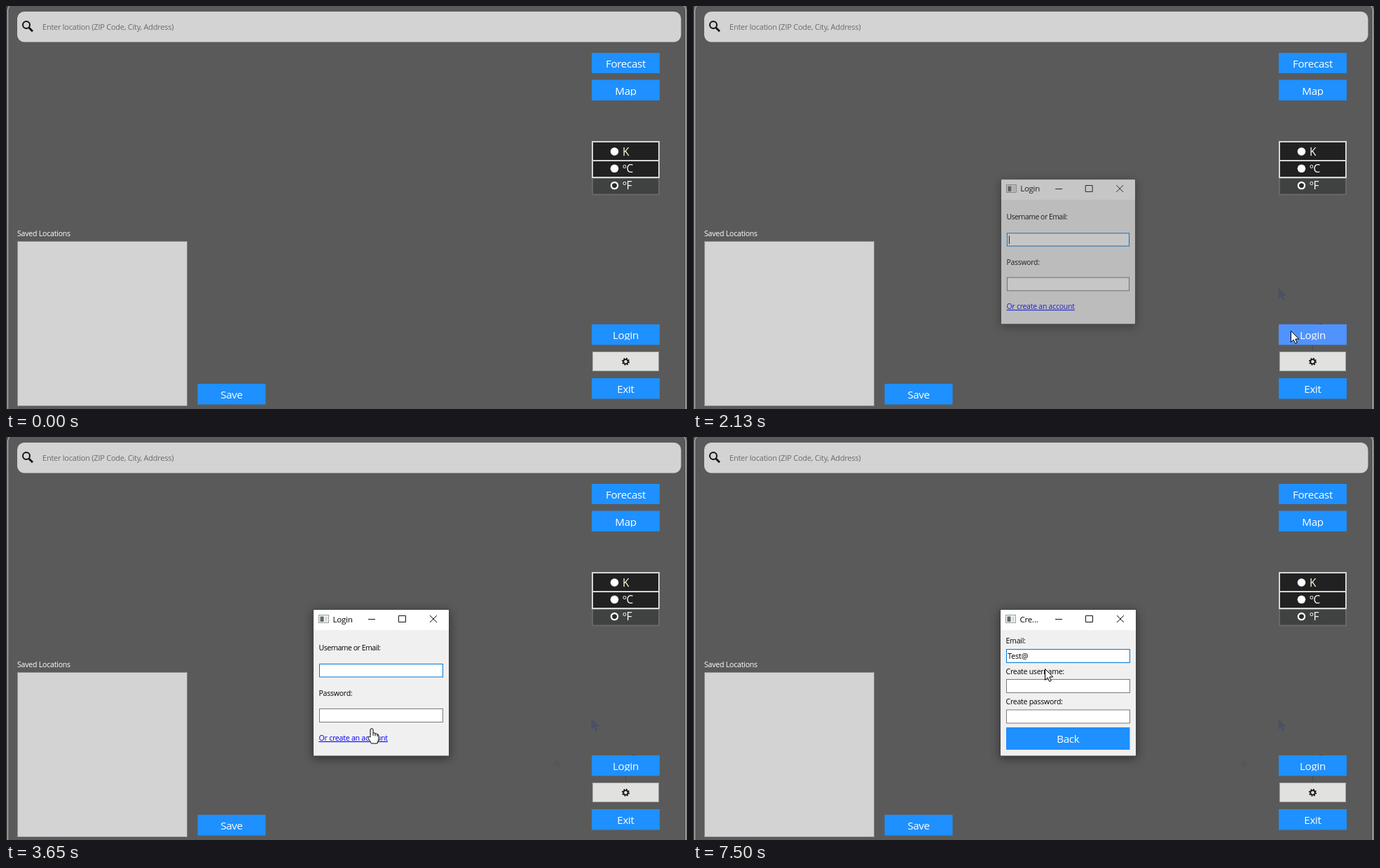
Write an HTML page that moves like this. It is 972 by 576 pixels and loops after 8 s.

```html
<!DOCTYPE html>
<html lang="en">
<head>
<meta charset="utf-8">
<title>Weather login</title>
<style>
  html, body { margin: 0; width: 100%; height: 100%; overflow: hidden; background: #5a5a5a; }
  svg { display: block; width: 972px; height: 576px; }
  text { font-family: "Open Sans", "Noto Sans", sans-serif; letter-spacing: -.022em; white-space: pre; }
  #dialog { filter: drop-shadow(0 3px 7px rgba(0, 0, 0, .45)); }
</style>
</head>
<body>
<svg id="stage" viewBox="0 0 972 576"></svg>
<script>
const LOOP = 8000, STEP = 200 / 3;
const BLUE = '#1e90ff', HOVER = '#5093ff', FOCUS = '#0078d7';
const ARROW = 'M.5.5V16.5L4.2 13L6.7 18.5L9.2 17.4L6.8 12H11.8Z';
const HAND = 'M-2 1.8Q0-1 2 1.8V7Q4.200 6 5 8Q7 7 8 9Q9.800 8.500 9.800 11V16Q9 19 8 22H-.5L-5 14.500Q-5.500 11 -2 13Z';

const rect = (x, y, w, h, fill, extra = '') =>
  `<rect x="${x}" y="${y}" width="${w}" height="${h}" fill="${fill}" ${extra}/>`;
const text = (x, y, size, str, fill = '#000', extra = '') =>
  `<text x="${x}" y="${y}" font-size="${size}" fill="${fill}" ${extra}>${str}</text>`;
const line = (d, color, extra = '') => `<path d="${d}" fill="none" stroke="${color}" ${extra}/>`;
const label = (y, str, extra) => text(446.5, y, 10.5, str, '#000', extra);
const field = (y, id = '') => rect(447.5, y + .5, 176, 19, '#fff', `stroke="#7a7a7a" ${id}`);

// Labels are cut off just below the baseline when their button is too short.
function button(x, y, w, h, str, baseline, id = '', clipped = false) {
  const clip = clipped ? `style="clip-path:polygon(${x}px ${y}px,${x + w}px ${y}px,${x + w}px ${baseline + 1.5}px,${x}px ${baseline + 1.5}px);transform-box:view-box;clip-path:url(#c${y | 0})"` : '';
  const def = clipped ? `<clipPath id="c${y | 0}">${rect(x, y, w, baseline + 1.5 - y, '#000')}</clipPath>` : '';
  return def + rect(x, y, w, h, BLUE, id) +
    text(x + w / 2, baseline, 15.2, str, '#fff', `text-anchor="middle" ${clip}`);
}

const radio = (y, str, on, fill = '#fff') =>
  `<circle cx="868.5" cy="${y}" r="${on ? 4.6 : 5.8}" fill="${on ? '#2a2c2c' : '#fff'}" ` +
  `${on ? 'stroke="#fff" stroke-width="2.3"' : ''}/>` + text(880, y + 5.7, 15.5, str, fill);

const windowFrame =
  rect(0, 0, 972, 576, '#5a5a5a') + rect(0, 0, 2, 576, '#444') +
  line('M2.5 576V6Q2.5 2 6-1M970.5 576V6Q970.500 2 967-1', '#cfcfcf');

const search =
  rect(16, 8, 947.5, 43.5, '#d3d3d3', 'rx="10"') +
  '<circle cx="29" cy="27" r="5" fill="none" stroke="#111" stroke-width="2"/>' +
  line('M32.800 31L38 36.300', '#111', 'stroke-width="2.800"') +
  text(52, 34, 11, 'Enter location (ZIP Code, City, Address)', '#6c6c6c');

const units =
  rect(837, 246, 95, 23.5, '#3f4241', 'stroke="#686868" stroke-width="2"') +
  rect(837, 194, 95, 51, '#212121', 'stroke="#d6d6d6" stroke-width="2"') +
  line('M837 221H932', '#d6d6d6', 'stroke-width="2"') +
  radio(208, 'K', false, '#fffbe2') + radio(232.3, 'ºC') + radio(256.6, 'ºF', true);

const gear = rect(837.5, 494.5, 94, 27, '#e1e1df', 'stroke="#adadad"') +
  '<circle cx="884.500" cy="508.300" r="3.200" fill="none" stroke="#111" stroke-width="1.700"/>' +
  '<circle cx="884.500" cy="508.300" r="4.600" fill="none" stroke="#111" stroke-width="1.800" stroke-dasharray="1.806"/>';

const traces =
  `<path id="trace1" d="${ARROW}" transform="translate(835 402)" fill="#4a5161"/>` +
  line('M884.500 485V492', '#454a50', 'id="trace2"') +
  line('M893 454.500H898', '#454a50', 'id="trace3"') +
  `<path id="trace4" d="${ARROW}" transform="translate(783 458) scale(.85)" fill="#565657"/>`;

const chrome =
  rect(438, 246, 194.5, 210, '#f0f0f0') + rect(438, 246, 194.5, 30, '#fff') +
  rect(438.5, 246.5, 194, 209.5, 'none', 'stroke="#444"') +
  rect(446.5, 254.5, 14, 11, '#f4f4f4', 'stroke="#9a9a9a"') +
  rect(448.5, 256.5, 5, 7.5, '#5c6b66') + rect(455.5, 256.5, 3, 7.5, '#d4dad6') +
  text(466.5, 264.5, 11.6, 'Login', '#000', 'id="title"') +
  line('M517 260.500H527M560.500 255.500H570.500V264.500H560.500ZM605 255L615 265M615 255L605 265', '#111');

const loginForm = '<g id="login">' +
  label(305, 'Username or Email:', 'style="letter-spacing:-.045em"') + label(370, 'Password:') +
  rect(447.5, 324.5, 176, 18.5, '#fff', `stroke="${FOCUS}"`) + field(388) +
  text(446.5, 434, 10.6, 'Or create an account', '#00f', 'text-decoration="underline"') + '</g>';

const createForm = '<g id="create">' +
  label(294.5, 'Email:') + field(303, 'id="email"') +
  label(338.5, 'Create username:') + field(346) +
  label(382, 'Create password:') + field(389.5) +
  button(447, 415, 176.5, 32, 'Back', 437) +
  text(449, 317, 11, '', '#000', 'id="typed"') + '</g>';

const cursors =
  `<g id="cursor"><path id="arrow" d="${ARROW}" fill="#fff" stroke="#000"/>` +
  `<g id="hand"><path d="${HAND}" fill="#fff" stroke="#000"/>` +
  line('M2 7V11M5 8V11.500M8 9V12', '#000') + '</g>' +
  line('M-3-7.500H-1L0-6.500L1-7.500H3M0-6.500V6.500M-3 7.500H-1L0 6.500L1 7.500H3', '#000', 'id="beam" stroke-width="1.300"') + '</g>';

document.getElementById('stage').innerHTML =
  windowFrame + search +
  button(836, 67, 97, 29, 'Forecast', 88) + button(836, 105.5, 97, 29.5, 'Map', 127, '', true) + units +
  text(16, 328.5, 10.6, 'Saved Locations', '#fff') +
  rect(16.5, 336.5, 242, 235, '#d3d3d3', 'stroke="#8a8d92"') +
  button(273.5, 540, 97, 29.5, 'Save', 561) +
  button(836, 455, 97, 29.3, 'Login', 476, 'id="loginButton"', true) + gear +
  button(836, 532, 97, 29.5, 'Exit', 553) + traces +
  `<g id="dialog">${chrome}${loginForm}${createForm}${rect(450, 328, 1, 12, '#000', 'id="caret"')}</g>` + cursors;

const el = id => document.getElementById(id);
const show = (id, on) => el(id).setAttribute('display', on ? 'inline' : 'none');
const set = (id, name, value) => el(id).setAttribute(name, value);

// Pointer path: time, x, y
const path = [
  [320, 828, 372], [390, 835, 402], [580, 936, 552], [790, 885, 485], [930, 885, 485],
  [1120, 898, 454], [1330, 898, 454], [1460, 881, 458], [1660, 881, 458], [1850, 853, 464],
  [2150, 853, 464], [2212, 785, 458], [2265, 538, 416], [2330, 538, 416], [2590, 502, 347],
  [2670, 502, 347], [2930, 512, 434], [3260, 512, 434], [3650, 522, 415], [4120, 516, 435],
  [4320, 516, 435], [4400, 518, 441], [4920, 498, 314], [5860, 498, 314], [6050, 502, 331]
];
const keystrokes = [5320, 5520, 5590, 5720, 6840];
const caretStops = [449.5, 456, 462, 467, 470, 480];

function pointerAt(t) {
  const next = path.findIndex(p => p[0] > t);
  if (next < 0) return path[path.length - 1].slice(1);
  if (next === 0) return path[0].slice(1);
  const [t0, x0, y0] = path[next - 1], [t1, x1, y1] = path[next], k = (t - t0) / (t1 - t0);
  return [Math.round(x0 + (x1 - x0) * k), Math.round(y0 + (y1 - y0) * k)];
}

function caretVisible(t) {
  if (t < 4440) return Math.floor((t - 2050) / 530) % 2 === 0;
  return t < 6245 || (t >= 6765 && t < 7495);
}

function draw(now) {
  const t = now % LOOP;
  const frameTime = Math.floor((t + 20) / STEP) * STEP + 12;
  const [x, y] = pointerAt(frameTime);
  const open = t >= 1990, creating = t >= 4440;

  const overEmail = creating && y > 302 && y < 323;
  const overInput = open && !creating && x < 624 && ((y > 323 && y < 344) || (y > 387 && y < 408));
  const beam = overEmail || overInput;
  const hand = open && !creating && x < 624 && y >= 414;
  show('cursor', t >= 320);
  set('cursor', 'transform', `translate(${x} ${y})`);
  show('beam', beam);
  show('hand', hand);
  show('arrow', !beam && !hand);

  const overLogin = t >= 320 && x >= 836 && x < 933 && y >= 455 && y < 485;
  set('loginButton', 'fill', overLogin ? HOVER : BLUE);
  show('trace1', t >= 455);
  show('trace2', t >= 990);
  show('trace3', t >= 1390);
  show('trace4', t >= 2265);

  // The dialog fades in while growing slightly.
  const p = Math.min(1, Math.max(0, (frameTime - 1990) / 340));
  const ease = 1 - (1 - p) ** 1.75, scale = p < .8 ? .95 + .06 * Math.min(ease, .83) : 1;
  show('dialog', open);
  set('dialog', 'opacity', ease);
  set('dialog', 'transform', `translate(535 351) scale(${scale}) translate(-535 -351)`);

  show('login', !creating);
  show('create', creating);
  el('title').textContent = creating ? 'Cre...' : 'Login';
  set('email', 'stroke', overEmail ? '#171717' : FOCUS);
  const count = keystrokes.filter(k => t >= k).length;
  el('typed').textContent = 'Test@'.slice(0, count);
  show('caret', open && caretVisible(t));
  set('caret', 'x', creating ? caretStops[count] : 450);
  set('caret', 'y', creating ? 306.5 : 328);
}

const start = performance.now();
(function tick() {
  draw(performance.now() - start);
  requestAnimationFrame(tick);
})();
</script>
</body>
</html>
```
